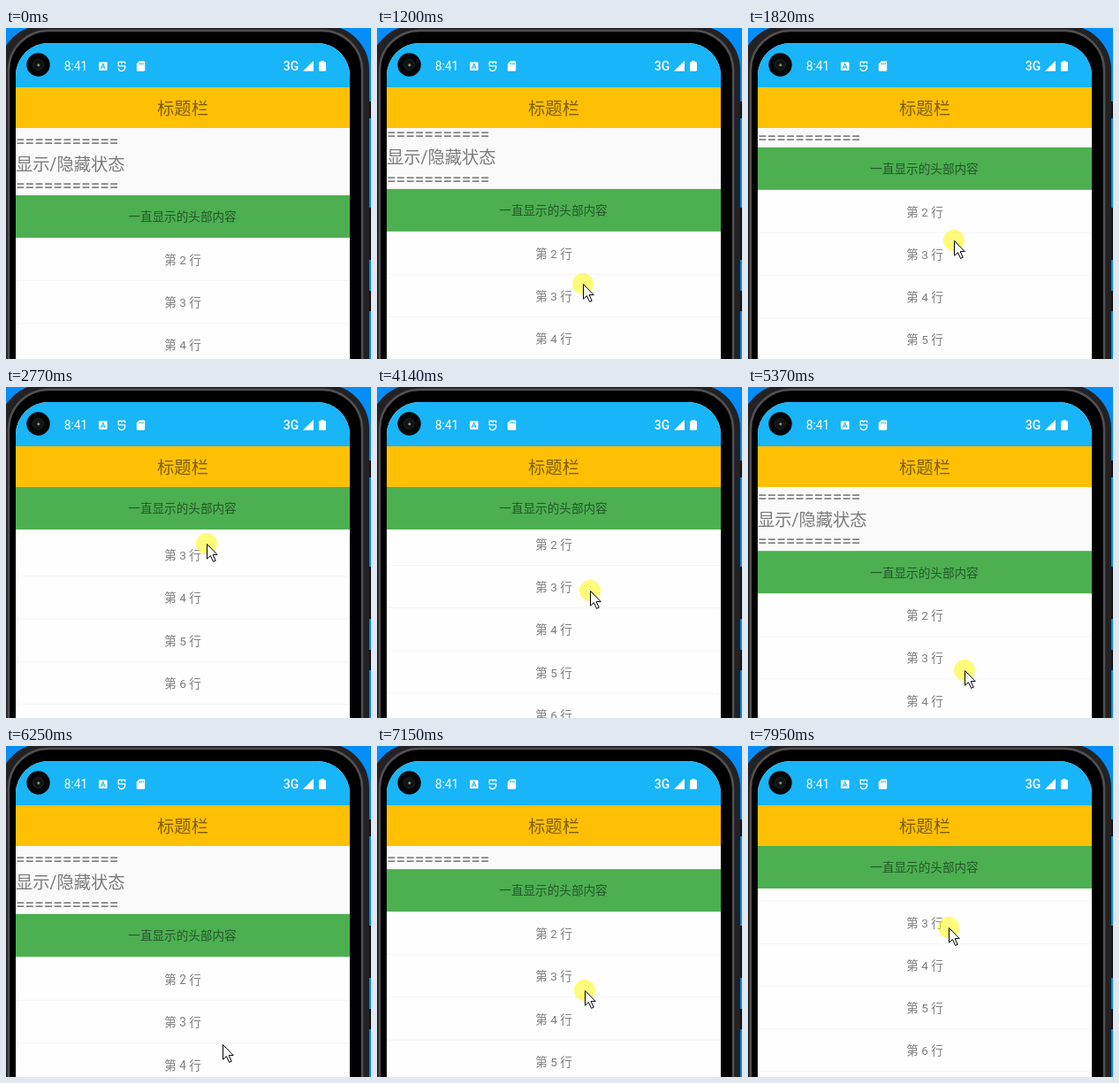
These frames come from a looping animation (413 px wide and 374 px high, 8000 ms). An HTML page:

```html
<!DOCTYPE html>
<html lang="zh-CN">
<head>
<meta charset="utf-8">
<title>Sticky header</title>
<style>
html, body { margin: 0; width: 100%; height: 100%; overflow: hidden; background: #058ef9; }
svg { display: block; width: 413px; height: 374px; }
text { font-family: Roboto, "Noto Sans CJK SC", "Noto Sans CJK", sans-serif; }
.body { fill: #000; fill-opacity: .51; }
.big { font-size: 19.3px; }
.small { font-size: 13.6px; text-anchor: middle; }
</style>
</head>
<body>
<svg viewBox="0 0 413 374" xmlns="http://www.w3.org/2000/svg">
  <defs>
    <clipPath id="screen"><rect x="11" y="17" width="378" height="440" rx="37"/></clipPath>
    <clipPath id="view"><rect x="11" y="113" width="378" height="261"/></clipPath>
  </defs>

  <rect width="413" height="374" fill="#058ef9"/>
  <g fill="#141416">
    <rect x="408" y="83" width="5" height="19"/>
    <rect x="408" y="203" width="5" height="59"/>
    <rect x="408" y="297" width="5" height="23"/>
  </g>
  <rect x="-8" y="-3" width="419" height="500" rx="50" fill="#222224"/>
  <rect x="3" y="3" width="400" height="490" rx="45" fill="#000" stroke="#505052" stroke-width="2.5"/>

  <g clip-path="url(#screen)">
    <rect x="11" y="17" width="378" height="357" fill="#fefefe"/>
    <rect x="11" y="17" width="378" height="50" fill="#18b5f8"/>
    <g clip-path="url(#view)">
      <g id="content">
        <g id="list"></g>
        <g id="intro">
          <rect x="11" y="113" width="378" height="76" fill="#fafafa"/>
          <text class="body big" x="11" y="134.5">===========</text>
          <text class="body big" x="11" y="160.5">显示/隐藏状态</text>
          <text class="body big" x="11" y="185">===========</text>
        </g>
        <g id="sticky">
          <rect x="11" y="189" width="378" height="48" fill="#4caf50"/>
          <text class="body small" x="199.5" y="218.3">一直显示的头部内容</text>
        </g>
      </g>
    </g>
    <rect x="11" y="67" width="378" height="46" fill="#ffc003"/>
    <text class="body big" x="200" y="98" text-anchor="middle">标题栏</text>
  </g>

  <g fill="#fff">
    <text x="65.7" y="48.4" font-size="13.8">8:41</text>
    <rect x="105" y="38.5" width="9.5" height="9.5" rx="1"/>
    <path d="M107.4 46 109.75 40.4 112.1 46M108.3 44.2h2.9" fill="none" stroke="#18b5f8" stroke-width="1.1"/>
    <path d="M134.6 40.6V38.4h-7.4v4.4h7.4v2.4q-.4 3-3.7 3.4-3.3-.4-3.7-3M130.9 38.4v2.2" fill="none" stroke="#fff" stroke-width="1.3"/>
    <path d="M150.8 37.5h5.4q1 0 1 1v9.2q0 1-1 1h-7.4q-1 0-1-1v-7.2z"/>
    <path d="M151.4 39.3v2.2M153.3 39.3v2.2M155.2 39.3v2.2" stroke="#18b5f8"/>
    <text x="313.8" y="48.4" font-size="14" font-weight="500">3G</text>
    <path d="M348 37v11.7h-12z"/>
    <path d="M356.5 37h3v1.2h1.5q1 0 1 1v8.6q0 1-1 1h-6q-1 0-1-1v-8.6q0-1 1-1h1.5z"/>
  </g>

  <circle cx="36.5" cy="41.5" r="13.2" fill="#050505"/>
  <circle cx="36.5" cy="41.5" r="6" fill="#121314" stroke="#222425"/>
  <circle cx="36.8" cy="41.8" r="1.6" fill="#7c8a80"/>

  <g id="pointer">
    <circle id="touch" r="12" fill="#fdf800" fill-opacity=".52"/>
    <path d="M.5.5V17.2L4.4 13.6 7.6 20.4 10.2 19.2 7.1 12.6H12.2z" fill="#fff" stroke="#000"/>
  </g>
</svg>
<script>
const LOOP = 8000, TOP = 113, INTRO = 76, ROW = 48.2;
const $ = id => document.getElementById(id);

const ramp = (t, from, span) => Math.min(1, Math.max(0, (t - from) / span));
const swipe = (t, from, span) => 1 - (1 - ramp(t, from, span)) ** 1.15;

// The list goes up, back to the top, and up again.
const offset = t =>
  149 * (swipe(t, 1110, 2190) - swipe(t, 3290, 2170)) + 140 * swipe(t, 6550, 1890);

const stretch = t => .01 * (ramp(t, 5460, 440) - ramp(t, 6260, 220));

const pressed = t => t >= 1070 && t < 6249 && !(t > 3120 && t < 3330) || t > 6540;

// Where the finger holds the list: time, x, y at zero offset
const grip = [
  [210, 336, 376], [990, 233, 297], [1820, 233, 294], [2770, 227, 297], [4140, 241, 314],
  [4820, 244, 310.5], [5900, 245, 337], [6250, 245, 337], [7950, 227, 315.5]
];

function hold(t) {
  const i = Math.max(1, grip.findIndex(g => g[0] >= t));
  const [a, b] = t > 7950 ? grip.slice(-2) : [grip[i - 1], grip[i]];
  const k = ramp(t, a[0], b[0] - a[0]);
  return [1, 2].map(n => a[n] + (b[n] - a[n]) * k);
}

let rows = "";
for (let n = 2; n < 10; n++) {
  const y = 262 + ROW * (n - 2);
  rows += `<text class="body small" x="200" y="${y + 5}">第 ${n} 行</text>` +
    `<rect x="11" y="${y + 23}" width="378" height="1" fill="#f5f5f5"/>`;
}
$("list").innerHTML = rows;

const move = (id, x, y) => $(id).setAttribute("transform", `translate(${x} ${y})`);

function draw(t) {
  const s = offset(t), k = 1 + stretch(t), [x, y] = hold(t);
  move("list", 0, -s);
  move("intro", 0, -s);
  move("sticky", 0, -Math.min(s, INTRO));
  $("content").setAttribute("transform", `matrix(1 0 0 ${k} 0 ${TOP * (1 - k)})`);
  move("pointer", Math.round(x), Math.round(y - s));
  $("pointer").style.display = t < 210 ? "none" : "";
  $("touch").style.display = pressed(t) ? "" : "none";
}

const start = performance.now();
function tick() {
  draw((performance.now() - start) % LOOP);
  requestAnimationFrame(tick);
}
tick();
</script>
</body>
</html>
```
